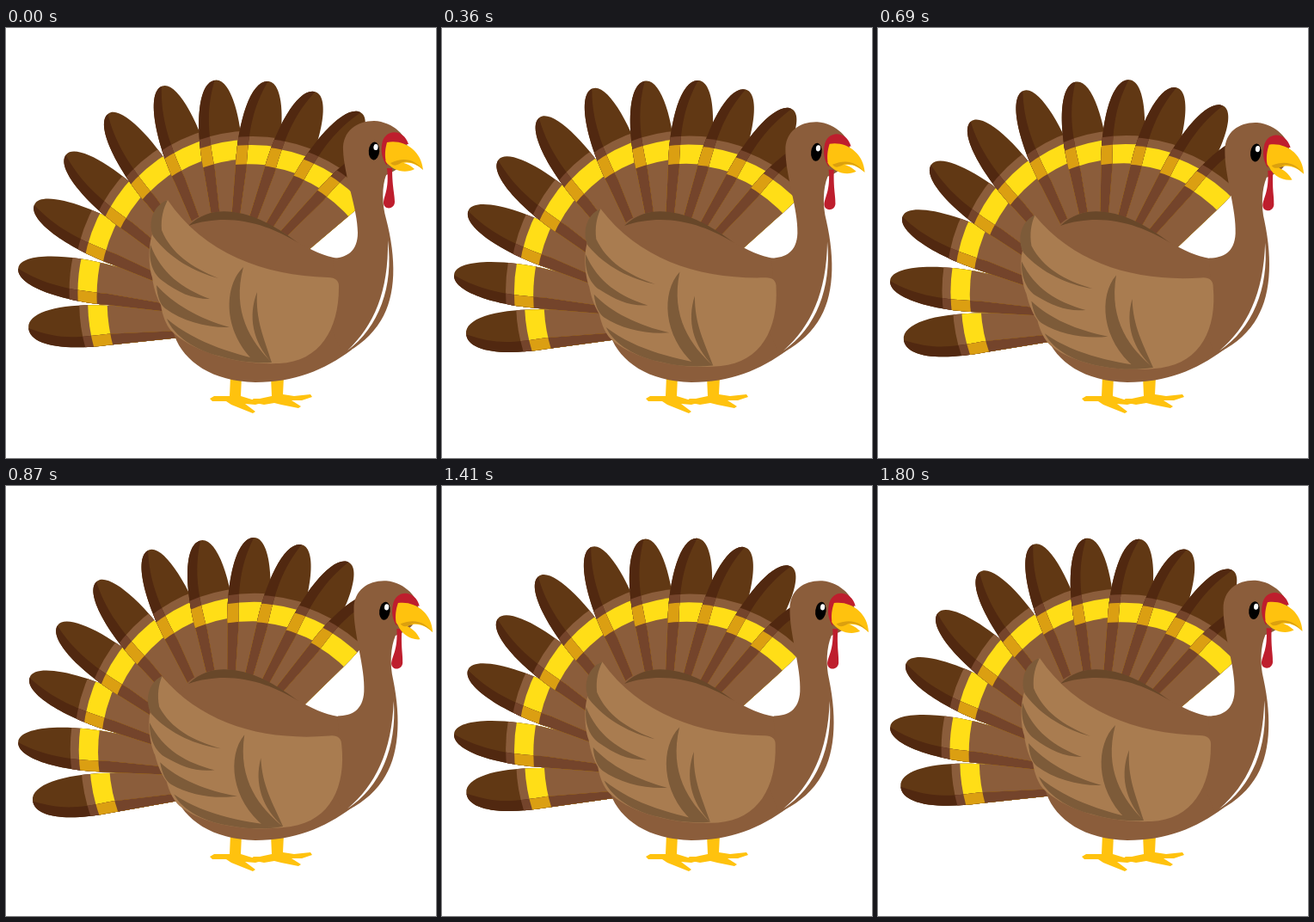
These frames come from a looping animation (500x500 px, 1830 ms). An HTML page with a canvas:

```html
<!DOCTYPE html>
<html lang="en">
<head>
<meta charset="utf-8">
<title>Turkey</title>
<style>
html, body { margin: 0; width: 100%; height: 100%; overflow: hidden; background: #fff; }
canvas { display: block; width: 500px; height: 500px; }
</style>
</head>
<body>
<canvas id="stage" width="500" height="500"></canvas>
<script>
const ctx = document.getElementById('stage').getContext('2d');
const LOOP = 1830, HALF = 915, STEP = 30;

const BROWN = '#8b5d3b', TAN = '#a97c50', SHADE = '#7d5b39';
const YELLOW = '#ffc20e', GOLD = '#dba00f', RED = '#be1e2d';
// feather colours: tip, main, band
const LIT = ['#613814', BROWN, '#ffde17'];
const DIM = ['#512810', '#74442b', '#db9f12'];

// angle in degrees, length, radius where the dark tip ends
const FEATHERS = [
  [-92.2, 242, 181], [-79.7, 258, 197], [-64.3, 261, 197], [-49.8, 260, 193],
  [-35, 261, 193], [-19.6, 260, 194], [-5.8, 253, 190], [8.3, 253, 188],
  [21, 255, 190], [34, 258, 190], [46, 245, 190]
];

const BODY = new Path2D('M200 250C205 222 235 211 262 214C290 217 315 233 338 248C355 259 370 265 386 268L402 300L402 374C370 398 335 412 290 412C240 411 207 388 196 358C182 322 185 280 200 250Z');
const ARC = new Path2D('M212 230C230 213 248 212 265 214C294 218 318 234 340 250C308 230 262 213 212 230Z');
const LEGS = new Path2D('M261 405L274 405L273 428L286 432L303 430L304 434L290 438L278 437L290 446L287 448L262 438L256 434L240 434L237 431L242 428L260 428Z M308 405L323 405L322 426L335 428L354 426L356 429L344 433L332 433L343 440L340 442L320 438L312 436L300 438L290 436L287 431L295 431L309 428Z');

const WING = new Path2D('M188 200C176 205 168 222 170 240C166 250 165 275 170 290C172 305 176 315 180 322C182 335 186 345 192 352C215 375 265 392 318 390C365 388 387 350 387 302Q388 290 374 290C300 288 230 262 188 200Z');
const WING_SHADES = new Path2D([
  'M188 200C170 206 165 228 171 242C190 268 220 284 247 291C215 278 192 262 181 235C180 220 183 210 188 200Z',
  'M168 252C165 272 172 287 182 294C200 307 215 315 237 315C205 303 180 285 168 252Z',
  'M175 299C176 314 180 322 185 326C205 341 235 349 260 348C225 338 194 321 175 299Z',
  'M187 338C195 358 220 375 250 382C270 388 290 390 308 389C270 380 222 368 187 338Z',
  'M276 278C253 300 252 352 288 387L309 389C285 365 262 330 276 278Z',
  'M292 307C281 335 287 365 309 389C300 360 290 340 292 307Z'
].join(' '));

const NECK = new Path2D('M392 142C391 120 408 108 428 108C450 109 468 126 467 142C466 158 454 166 442 171C437 184 437 205 442 222C454 268 454 311 436 340C425 358 411 369 392 380L370 330L382 290L380 268C396 267 409 260 409 238C409 210 393 172 392 142Z');
const GLOSS = new Path2D('M444 247C451 300 434 348 397 375C428 346 445 306 444 247Z');
const FACE = new Path2D('M437 136C439 117 462 116 468 135L447 137C442 144 443 152 443 160C437 152 436 144 437 136Z');
const WATTLE = new Path2D('M443 163L449 163C449 185 452 193 452 202C452 211 440 212 439 204C439 195 446 188 443 163Z');
const BEAK = new Path2D('M443 133C462 129 483 142 485 165C476 157 466 154 456 159C450 162 445 160 442 156C440 148 441 140 443 133Z');
const BEAK_EDGE = new Path2D('M485 165C476 154 464 149 447 157C451 162 456 159 461 156C469 154 478 158 485 165Z');
const JAW = new Path2D('M441 154C451 158 462 152 475 164C466 169 450 168 441 154Z');

function paint(path, color) {
  ctx.fillStyle = color;
  ctx.fill(path);
}

function turned(x, y, angle, draw) {
  ctx.save();
  ctx.translate(x, y);
  ctx.rotate(angle);
  ctx.translate(-x, -y);
  draw();
  ctx.restore();
}

// bands are slightly bowed and slope down to the shaded side
function bands(len, edge, colors) {
  const layer = (r, color) => {
    ctx.fillStyle = color;
    ctx.beginPath();
    ctx.moveTo(-34, 6.5 - r);
    ctx.quadraticCurveTo(0, -r - 3, 34, -0.5 - r);
    ctx.lineTo(34, 5);
    ctx.lineTo(-34, 5);
    ctx.fill();
  };
  layer(len + 10, colors[0]);
  layer(edge, colors[1]);
  layer(edge - 10, colors[2]);
  layer(edge - 32.5, colors[1]);
}

function feather([deg, len, edge], i) {
  ctx.save();
  // the lowest feathers are rooted a little further down
  ctx.translate(268, 312 + 28 * 0.5 ** i);
  ctx.rotate(deg * Math.PI / 180);
  ctx.beginPath();
  ctx.moveTo(-13, 0);
  ctx.lineTo(-23, -150);
  ctx.bezierCurveTo(-28, -205, -19, -len, 1, -len);
  ctx.bezierCurveTo(19, -len, 28, -205, 23, -150);
  ctx.lineTo(13, 0);
  ctx.clip();
  bands(len, edge, LIT);
  // darker strip along one side
  ctx.beginPath();
  ctx.moveTo(1, -len - 2);
  ctx.bezierCurveTo(-13, -len + 32, -14, -195, -10, -150);
  ctx.lineTo(-9, 0);
  ctx.lineTo(-34, 0);
  ctx.lineTo(-34, -len - 2);
  ctx.clip();
  bands(len, edge, DIM);
  ctx.restore();
}

function oval(x, y, rx, ry, color) {
  ctx.fillStyle = color;
  ctx.beginPath();
  ctx.ellipse(x, y, rx, ry, 0.08, 0, Math.PI * 2);
  ctx.fill();
}

function head(jaw) {
  paint(NECK, BROWN);
  paint(GLOSS, '#fff');
  paint(WATTLE, RED);
  paint(FACE, RED);
  turned(445, 157, jaw, () => paint(JAW, YELLOW));
  paint(BEAK, YELLOW);
  paint(BEAK_EDGE, GOLD);
  oval(428, 143, 6.2, 10.5, '#000');
  oval(430, 138.5, 2.6, 3.6, '#fff');
}

function wing() {
  paint(WING, TAN);
  paint(WING_SHADES, SHADE);
}

const tailTurn = t => -0.076 * (1 - Math.abs(t - HALF) / HALF);

function wingTurn(t) {
  const u = t / HALF;
  return -0.113 * (u < 1 ? u + 0.3 * u * (1 - u) : (2 - u) ** 2);
}

function headTurn(t) {
  const top = 1140;
  const shift = t < top ? 13 * (1 - (1 - t / top) ** 2.2) : 13 - 8e-6 * (t - top) ** 2;
  return shift / 232;
}

function jawTurn(t) {
  const u = (t - 500) / 630;
  return u > 0 && u < 1 ? 0.36 * Math.sin(Math.PI * u) : 0;
}

function draw(t) {
  ctx.fillStyle = '#fff';
  ctx.fillRect(0, 0, 500, 500);
  turned(270, 290, tailTurn(t), () => FEATHERS.forEach(feather));
  paint(LEGS, YELLOW);
  paint(BODY, BROWN);
  paint(ARC, '#684729');
  turned(392, 375, headTurn(t), () => head(jawTurn(t)));
  turned(380, 272, wingTurn(t), wing);
}

const start = performance.now();
function tick() {
  const t = (performance.now() - start) % LOOP;
  draw(Math.floor(t / STEP) * STEP);
  requestAnimationFrame(tick);
}
tick();
</script>
</body>
</html>
```
